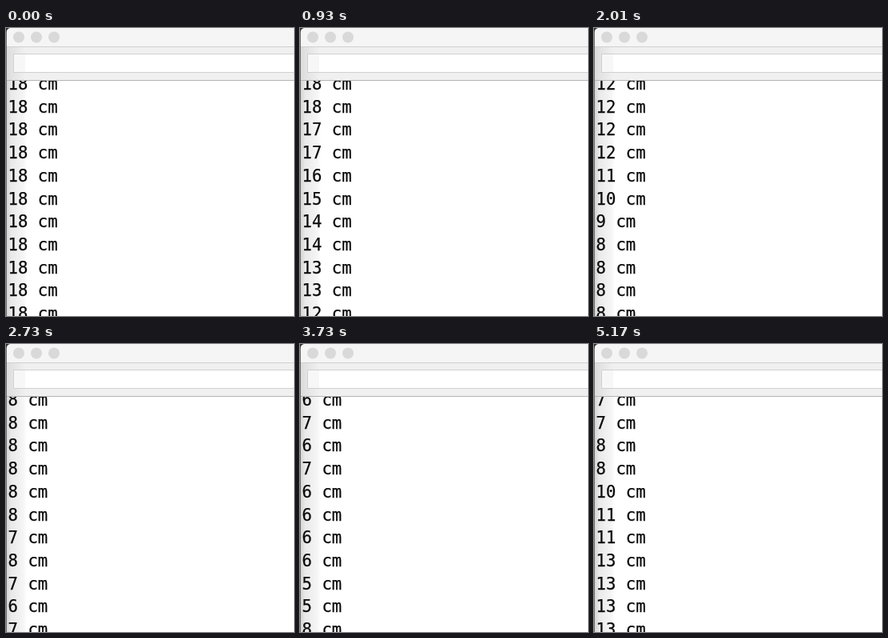
Recreate the animation shown at these times as an HTML page. Size 360x360 px, loop 5.2 s.

```html
<!DOCTYPE html>
<html lang="en">
<head>
<meta charset="utf-8">
<title>Distance monitor</title>
<style>
  html, body { margin: 0; width: 100%; height: 100%; overflow: hidden; background: #fff; }
  svg { display: block; width: 100vw; height: 100vh; }
  text { font: 500 20.6px "DejaVu Sans Mono", monospace; white-space: pre; fill: #0a0a0a; stroke: #0a0a0a; stroke-width: .25; }
</style>
</head>
<body>
<svg viewBox="0 0 360 360">
  <defs>
    <linearGradient id="shade">
      <stop offset="0" stop-color="#d2d2d2"/>
      <stop offset=".25" stop-color="#e9e9e9"/>
      <stop offset=".85" stop-color="#f6f6f6"/>
      <stop offset="1" stop-color="#fff"/>
    </linearGradient>
    <linearGradient id="edge">
      <stop offset="0" stop-color="#dcdcdc"/>
      <stop offset="1" stop-color="#f0f0f0"/>
    </linearGradient>
    <clipPath id="pane"><rect y="66" width="360" height="294"/></clipPath>
  </defs>
  <rect width="360" height="360" fill="#fff"/>
  <rect y="66" width="26" height="294" fill="url(#shade)"/>
  <g id="rows" clip-path="url(#pane)"></g>

  <rect width="360" height="23" fill="#f5f5f5"/>
  <g fill="#d9d9d9">
    <circle cx="16" cy="11.5" r="7"/>
    <circle cx="38" cy="11.5" r="7"/>
    <circle cx="60" cy="11.5" r="7"/>
  </g>
  <rect y="23" width="360" height="42" fill="#f0f0f0"/>
  <rect y="23" width="24" height="42" fill="url(#edge)"/>
  <rect y="23" width="360" height="1" fill="#cfcfcf"/>
  <rect x="9.5" y="32.5" width="360" height="23" fill="#fff" stroke="#d0d0d0"/>
  <rect x="10" y="33" width="14" height="22" fill="#f7f7f7"/>
  <rect y="65" width="360" height="1" fill="#b4b4b4"/>
  <rect width="1" height="360" fill="#6e6e6e"/>
  <path d="M0 0H5Q1 1 0 6Z" fill="#333"/>
</svg>
<script>
const LOOP = 5200, TICK = 72, ROWS = 11, PITCH = 28.72, BASE = 77;

// Readings as [value, repeats] pairs
const readings = [
  [18, 11], [17, 2], [16, 1], [15, 1], [14, 2], [13, 2], [12, 5], [11, 1], [10, 1],
  [9, 1], [8, 6], [7, 1], [8, 1], [7, 1], [6, 1], [7, 1], [6, 1], [7, 1], [6, 4],
  [5, 2], [8, 1], [5, 2], [6, 1], [7, 2], [8, 2], [10, 1], [11, 2], [13, 4]
].flatMap(([value, n]) => Array(n).fill(value));

// Ticks on which no new line arrives
const idle = [2, 5, 9, 12, 16, 19, 22, 25, 29, 32, 35, 39, 42, 45, 48, 51, 54, 58, 61, 64, 67, 71];

const group = document.getElementById("rows");
const rows = Array.from({ length: ROWS }, (_, i) => {
  const row = document.createElementNS("http://www.w3.org/2000/svg", "text");
  row.setAttribute("x", 2.6);
  row.setAttribute("y", BASE + i * PITCH);
  return group.appendChild(row);
});

function draw(time) {
  const t = Math.floor(time % LOOP / 10) * 10;
  const tick = Math.floor((t + 15) / TICK);
  const first = tick - idle.filter(k => k <= tick).length;
  rows.forEach((row, i) => {
    const line = readings[first + i] + " cm";
    if (row.textContent !== line) row.textContent = line;
  });
}

const start = performance.now();
function loop() {
  draw(performance.now() - start);
  requestAnimationFrame(loop);
}
loop();
</script>
</body>
</html>
```
